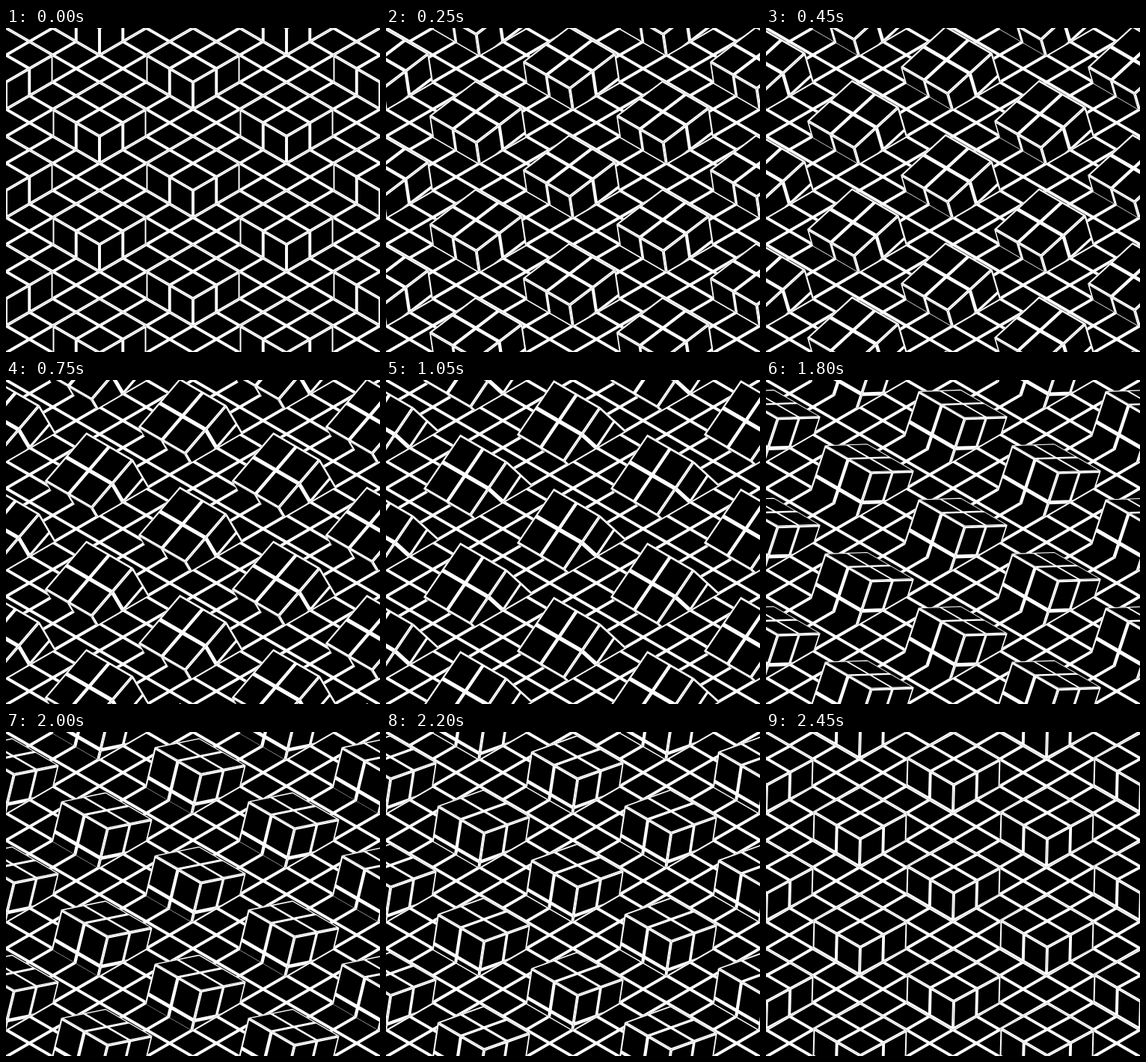
An HTML page with a canvas for the animation above (2500 ms loop, 500 by 433 pixels).

```html
<!DOCTYPE html>
<html lang="en">
<head>
<meta charset="utf-8">
<title>Rolling cubes in an isometric floor</title>
<style>
  html, body { margin: 0; width: 100%; height: 100%; overflow: hidden; background: #000; }
  canvas { display: block; }
</style>
</head>
<body>
<canvas id="stage" width="500" height="433"></canvas>
<script>
const WIDTH = 500, HEIGHT = 433;
const LOOP = 2500, STEP = 50;
const LINE = 0.125;             // line width in grid units
const DX = WIDTH / 16;          // isometric projection of one grid unit
const DY = 18.085;
const ctx = document.getElementById('stage').getContext('2d');
const start = performance.now();

const project = ([x, y, z]) => [(x + y) * DX, (x - y - 2 * z) * DY];

// Maps local face coordinates (a, b) onto the screen.
function usePlane(origin, u, v, cx, cy) {
  const [ox, oy] = project(origin);
  ctx.setTransform(...project(u), ...project(v), cx + ox, cy + oy);
}

function strokeGrid(n) {
  ctx.beginPath();
  for (let i = -n; i <= n; i++) {
    ctx.moveTo(i, -n); ctx.lineTo(i, n);
    ctx.moveTo(-n, i); ctx.lineTo(n, i);
  }
  ctx.lineWidth = LINE;
  ctx.strokeStyle = '#fff';
  ctx.stroke();
}

// The part of a face that lies above the floor, in local coordinates.
function aboveFloor({ origin, u, v }) {
  const height = ([a, b]) => origin[2] + a * u[2] + b * v[2];
  const corners = [[-1, -1], [1, -1], [1, 1], [-1, 1]];
  const points = [];
  corners.forEach((p, i) => {
    const q = corners[(i + 1) % 4];
    const hp = height(p), hq = height(q);
    if (hp >= 0) points.push(p);
    if ((hp >= 0) !== (hq >= 0)) {
      const k = hp / (hp - hq);
      points.push([p[0] + k * (q[0] - p[0]), p[1] + k * (q[1] - p[1])]);
    }
  });
  return points;
}

function visibleFaces(angle) {
  const c = Math.cos(angle), s = Math.sin(angle);
  const x = [1, 0, 0], y = [0, c, s], z = [0, -s, c];
  const side = c > s ? [0, -c, -s] : y;
  return [
    { origin: x, u: y, v: z },
    { origin: z, u: x, v: y },
    { origin: side, u: x, v: z }
  ].map(face => ({ ...face, outline: aboveFloor(face) }))
   .filter(face => face.outline.length > 2);
}

function drawCube(faces, cx, cy) {
  const onFace = (face, paint) => {
    ctx.save();
    usePlane(face.origin, face.u, face.v, cx, cy);
    ctx.beginPath();
    face.outline.forEach(p => ctx.lineTo(...p));
    ctx.closePath();
    paint();
    ctx.restore();
  };
  ctx.fillStyle = '#000';
  faces.forEach(face => onFace(face, () => ctx.fill()));
  faces.forEach(face => onFace(face, () => { ctx.clip(); strokeGrid(1); }));
}

function draw(time) {
  const step = Math.floor((time % LOOP) / STEP);
  const faces = visibleFaces(step * STEP / LOOP * Math.PI / 2);

  ctx.setTransform(1, 0, 0, 1, 0, 0);
  ctx.fillStyle = '#000';
  ctx.fillRect(0, 0, WIDTH, HEIGHT);

  usePlane([0, 0, 0], [1, 0, 0], [0, 1, 0], WIDTH / 2, 4 * DY);
  strokeGrid(32);

  // Back rows first, so that nearer cubes cover them.
  for (let row = -1; row <= 8; row++) {
    const shift = row % 2 ? 0 : 4 * DX;
    for (let col = -1; col <= 3; col++) {
      drawCube(faces, col * 8 * DX + shift, row * 4 * DY);
    }
  }
}

function tick() {
  draw(performance.now() - start);
  requestAnimationFrame(tick);
}
tick();
</script>
</body>
</html>
```
